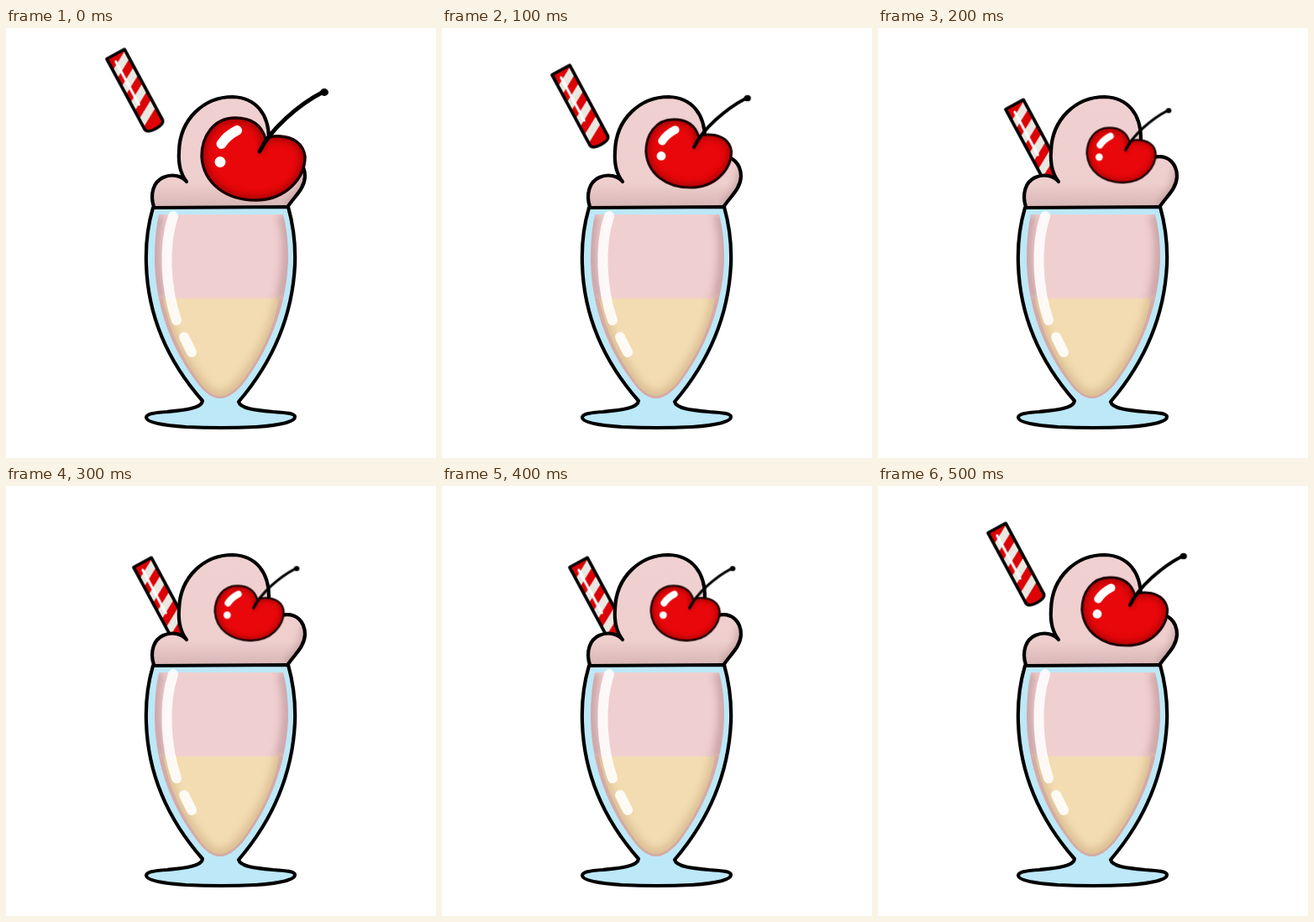
An HTML page that plays this animation: 512x512 px, repeating every 600 ms.

```html
<!DOCTYPE html>
<html lang="en">
<head>
<meta charset="utf-8">
<title>Milkshake</title>
<style>
  html, body { margin: 0; width: 100%; height: 100%; overflow: hidden; background: #fff; }
  svg { display: block; width: 100vw; height: 100vh; }
  .ink { fill: none; stroke: #000; stroke-width: 4.2; stroke-linecap: round; stroke-linejoin: round; }
  .shine { fill: none; stroke: #fff; stroke-linecap: round; }
  #straw, #cherry { transform-origin: 0 0; }
</style>
</head>
<body>
<svg viewBox="0 0 512 512">
  <defs>
    <path id="creamShape" d="M176 213C171 197 176 183 187 178C198 173 209 176 215 183C208 174 205 161 206 147C207 108 236 82 270 82C298 83 313 103 313 132L332 154C346 151 356 162 356 177C355 192 344 200 336 212Z"/>
    <path id="glassShape" d="M175 214C168 238 166 258 167 282C169 342 191 395 234 444C233 453 212 455 192 457C175 458 167 460 167 464C168 470 188 473 214 475Q256 477 298 475C327 473 344 469 344 463C344 459 334 458 318 457C296 455 279 453 277 445C318 397 341 342 344 282C345 258 343 238 336 213Z"/>
    <path id="drinkShape" d="M182 222H330C335 241 336 258 336 277C334 333 312 385 282 424Q267 441 255 441Q242 441 229 424C198 384 178 333 177 277C177 258 178 241 182 222Z"/>
    <path id="cherryShape" d="M309 132C304 115 292 107 273 107C247 107 233 129 233 153C235 185 262 205 297 205C333 205 356 179 356 153C354 137 341 130 327 129Q316 128 309 132Z"/>
    <path id="strawShape" d="M-12 0H12V96Q11 101 0 101Q-11 101 -12 96Z"/>
    <clipPath id="creamClip"><use href="#creamShape"/></clipPath>
    <clipPath id="drinkClip"><use href="#drinkShape"/></clipPath>
    <clipPath id="cherryClip"><use href="#cherryShape"/></clipPath>
    <clipPath id="strawClip"><use href="#strawShape"/></clipPath>
    <filter id="soft" x="-30%" y="-30%" width="160%" height="160%"><feGaussianBlur stdDeviation="5"/></filter>
    <linearGradient id="creamFill" x1="0" y1="82" x2="0" y2="213" gradientUnits="userSpaceOnUse">
      <stop offset="0" stop-color="#f0d0d0"/>
      <stop offset=".78" stop-color="#efcece"/>
      <stop offset="1" stop-color="#d8b6b6"/>
    </linearGradient>
  </defs>

  <g id="straw">
    <g transform="translate(130.5 31) rotate(-28.3)">
      <g clip-path="url(#strawClip)">
        <rect x="-14" width="28" height="104" fill="#dc0206"/>
        <g id="stripes" fill="#e9e7e1"></g>
        <path class="shine" d="M-4 8V66" stroke-width="3"/>
      </g>
      <use href="#strawShape" class="ink" style="stroke-width:3.7"/>
    </g>
  </g>

  <use href="#creamShape" fill="url(#creamFill)"/>
  <g clip-path="url(#creamClip)">
    <path d="M356 168C357 190 346 200 336 212" fill="none" stroke="#9d7879" stroke-width="9" opacity=".5" filter="url(#soft)"/>
  </g>
  <path class="ink" d="M176 213C171 197 176 183 187 178C198 173 209 176 215 183C208 174 205 161 206 147C207 108 236 82 270 82C298 83 313 103 313 132M328 154C346 150 356 162 356 177C355 192 344 200 336 212"/>

  <use href="#glassShape" fill="#bce8f8"/>
  <g clip-path="url(#drinkClip)">
    <rect x="170" y="215" width="172" height="107" fill="#f0cfd0"/>
    <rect x="170" y="322" width="172" height="122" fill="#f3dcb2"/>
    <path d="M182 222C176 250 176 286 184 322M330 222C338 250 337 286 328 322" fill="none" stroke="#a97f83" stroke-width="13" opacity=".55" filter="url(#soft)"/>
    <path d="M182 322C191 366 210 400 229 424Q242 441 255 441Q267 441 282 424C304 396 322 364 329 322" fill="none" stroke="#b99468" stroke-width="18" opacity=".4" filter="url(#soft)"/>
    <path d="M184 322C193 364 210 398 229 424Q242 441 255 441Q267 441 282 424C303 396 320 364 328 322" fill="none" stroke="#d4aaa8" stroke-width="5"/>
  </g>
  <path class="shine" d="M199 224C187 260 190 310 203 348" stroke-width="12" opacity=".87"/>
  <path class="shine" d="M212 368L221 386" stroke-width="12" opacity=".87"/>
  <use href="#glassShape" class="ink"/>

  <g id="cherry">
    <use href="#cherryShape" fill="#e8070a"/>
    <g clip-path="url(#cherryClip)">
      <use href="#cherryShape" fill="none" stroke="#650000" stroke-width="7" filter="url(#soft)" opacity=".7"/>
      <path d="M302 148Q306 139 309 131" fill="none" stroke="#780000" stroke-width="6" filter="url(#soft)" opacity=".6"/>
    </g>
    <use href="#cherryShape" class="ink" style="stroke:#1b0000;stroke-width:3.5"/>
    <path class="shine" d="M256.5 138Q263 128 275 122" stroke-width="12"/>
    <circle cx="255" cy="159.5" r="6.5" fill="#fff"/>
    <path class="ink" d="M302 147C315 120 349 91 376 77" style="stroke-width:4.8"/>
    <ellipse cx="379" cy="76.5" rx="5" ry="4.4"/>
  </g>
</svg>
<script>
  const LOOP = 600;
  const byId = id => document.getElementById(id);

  // Slanted stripes, repeated down the straw
  byId('stripes').innerHTML = [0, 1, 2, 3].map(i => {
    const y = i * 22 + 1;
    return `<path d="M13 ${y}V${y + 11}L-13 ${y + 26}V${y + 15}Z"/>`;
  }).join('');

  // Poses: out, halfway, seated
  const strawPoses = [[0, 0], [11, 19], [32, 60]]
    .map(([x, y]) => `translate(${x}px, ${y}px)`);

  // Each cherry pose is pinned at its left and top edges
  const cherryPoses = [[232, 106, 1], [242, 108, 0.828], [248, 118, 0.667]]
    .map(([x, y, s]) => `translate(${x}px, ${y}px) scale(${s}) translate(-232px, -106px)`);

  const steps = [[0, 0], [100, 1], [200, 2], [500, 1], [600, 1]];

  function play(id, poses) {
    const frames = steps.map(([time, pose]) => ({
      offset: time / LOOP,
      transform: poses[pose],
      easing: 'steps(1, end)'
    }));
    const move = byId(id).animate(frames, { duration: LOOP, iterations: Infinity });
    move.startTime = 0;
  }

  play('straw', strawPoses);
  play('cherry', cherryPoses);
</script>
</body>
</html>
```
